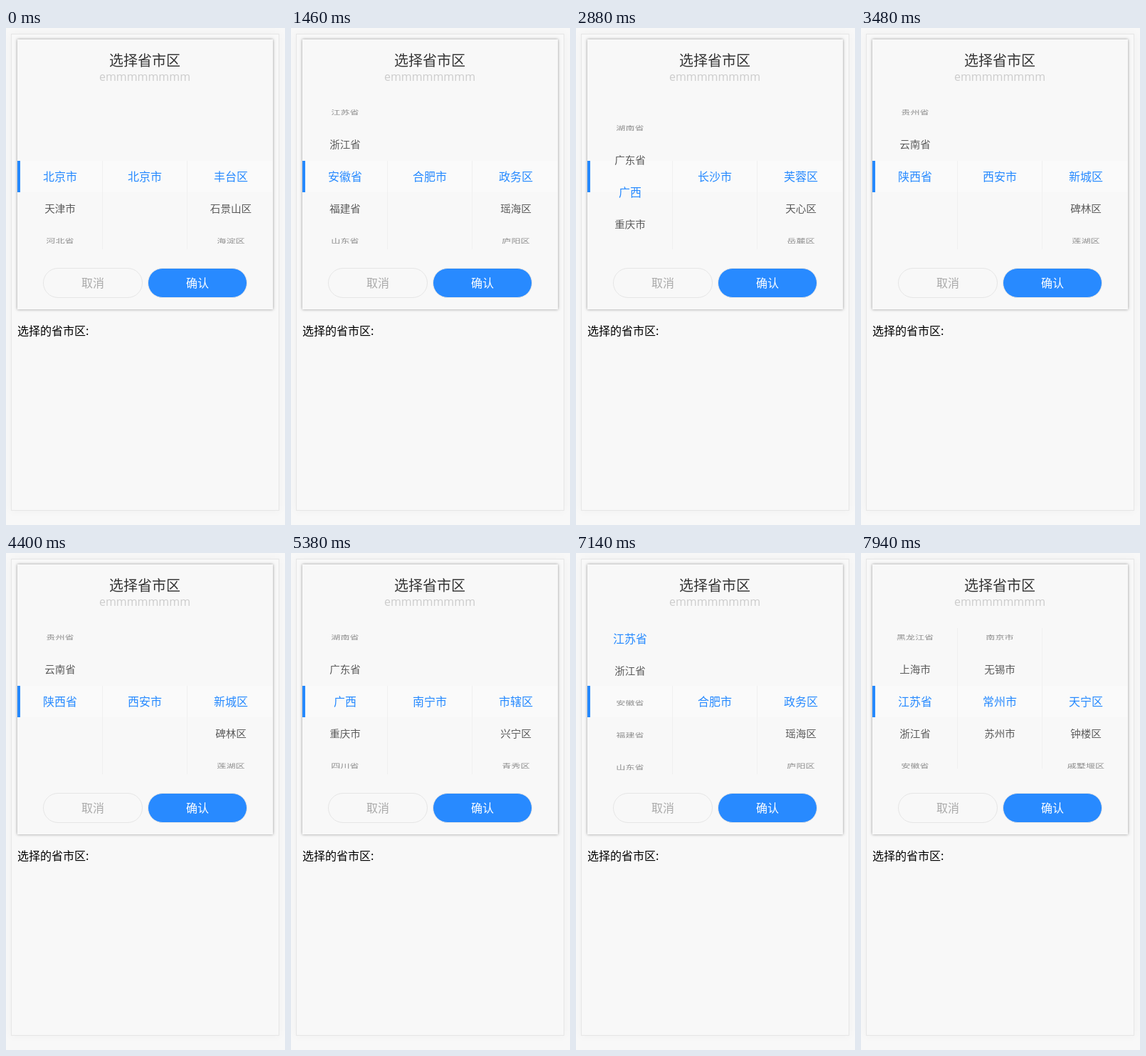
Animation, 392 px wide and 696 px high, one loop 8000 ms. Source, as an HTML page:

```html
<!DOCTYPE html>
<html lang="zh-CN">
<head>
<meta charset="utf-8">
<title>选择省市区</title>
<style>
  html, body { margin: 0; width: 100%; height: 100%; overflow: hidden; background: #f8f8f8; }
  body { position: relative; font: 16px/24px "Noto Sans CJK SC", "Noto Sans CJK", sans-serif; }
  div { position: absolute; box-sizing: border-box; white-space: nowrap; }
  .page { left: 7px; top: 8px; width: 377px; height: 668px; border: 1px solid #e6e6e6; box-shadow: 0 0 12px rgba(0,0,0,.04); }
  .panel { left: 16px; top: 16px; width: 359px; height: 378px; background: #f8f8f8; box-shadow: 0 0 4px rgba(0,0,0,.4); }
  .center { left: 0; width: 390px; text-align: center; }
  .title { top: 33px; font-size: 20px; color: #333; }
  .hint { top: 56px; font: 16px/24px "Open Sans", sans-serif; color: #ccc; }
  .band { left: 16px; top: 186px; width: 359px; height: 44px; background: #fafafa; border-left: 4px solid #2589ff; }
  .column { top: 105px; width: 120px; height: 205px; overflow: hidden; }
  .rail { left: 0; top: 81px; width: 120px; height: 206px; border: solid #f0f0f0; border-width: 0 1px; }
  .item { left: 0; top: 80px; width: 120px; height: 45px; line-height: 45px; text-align: center; color: #2589ff; }
  .near { color: #585858; }
  .far { color: #8c8c8c; }
  .button { top: 336px; height: 42px; line-height: 38px; border: 1px solid #e6e6e6; border-radius: 21px; text-align: center; }
  .cancel { left: 52px; width: 140px; color: #aaa; }
  .confirm { left: 199px; width: 140px; color: #fff; background: #288aff; }
  .result { left: 16px; top: 411px; color: #000; }
</style>
</head>
<body>
<div class="page"></div>
<div class="panel"></div>
<div class="center title">选择省市区</div>
<div class="center hint">emmmmmmmm</div>
<div class="band"></div>
<div class="column" style="left:16px"></div>
<div class="column" style="left:135px;width:121px"></div>
<div class="column" style="left:256px"></div>
<div class="button cancel">取消</div>
<div class="button confirm">确认</div>
<div class="result">选择的省市区:</div>
<script>
const LOOP = 8000, ROW = 45;

// One province per line: name | city districts... | next city...
const provinces = `北京市|北京市 丰台区 石景山区 海淀区
天津市|天津市 和平区 河东区 河西区
河北省|石家庄市 长安区 桥东区 桥西区
山西省|太原市 小店区 迎泽区 杏花岭区
内蒙古|呼和浩特市 新城区 回民区 玉泉区
辽宁省|沈阳市 和平区 沈河区 大东区
吉林省|长春市 南关区 宽城区 朝阳区
黑龙江省|哈尔滨市 道里区 南岗区 道外区
上海市|上海市 黄浦区 徐汇区 长宁区
江苏省|南京市 玄武区 白下区 秦淮区|无锡市 崇安区 南长区 北塘区|常州市 天宁区 钟楼区 戚墅堰区|苏州市 沧浪区 平江区 金阊区
浙江省|杭州市 上城区 下城区 江干区
安徽省|合肥市 政务区 瑶海区 庐阳区
福建省|福州市 鼓楼区 台江区 仓山区
山东省|济南市 市中区 历下区 天桥区
河南省|郑州市 中原区 二七区 管城回族区
湖北省|武汉市 江岸区 江汉区 硚口区
湖南省|长沙市 芙蓉区 天心区 岳麓区
广东省|广州市 荔湾区 越秀区 海珠区
广西|南宁市 市辖区 兴宁区 青秀区
重庆市|重庆市 万州区 涪陵区 渝中区
四川省|成都市 锦江区 青羊区 金牛区
贵州省|贵阳市 南明区 云岩区 花溪区
云南省|昆明市 五华区 盘龙区 官渡区
陕西省|西安市 新城区 碑林区 莲湖区 灞桥区 未央区`.split('\n').map(line => {
  const [name, ...cities] = line.split('|');
  return { name, cities: cities.map(city => {
    const [cityName, ...districts] = city.split(' ');
    return { name: cityName, districts };
  }) };
});

// Flicks: start, end, column, index reached
const flicks = [
  [580, 760, 0, 2], [920, 1080, 0, 7], [1280, 1460, 0, 11], [1680, 1860, 0, 12],
  [2060, 2240, 0, 14], [2460, 2620, 0, 16], [2800, 2960, 0, 18], [3100, 3260, 0, 21],
  [3400, 3480, 0, 23], [3800, 3960, 2, 2], [4240, 4400, 2, 0], [4640, 4800, 0, 22],
  [4920, 5060, 0, 20], [5220, 5380, 0, 18], [5800, 6000, 0, 17], [6140, 6340, 0, 15],
  [6520, 6720, 0, 13], [6820, 7000, 0, 11], [7140, 7340, 0, 9], [7780, 7940, 1, 2]
];

const columns = [...document.querySelectorAll('.column')];

// The CSS "ease" curve
function ease(x) {
  const bezier = (s, a, b) => 3 * s * (1 - s) ** 2 * a + 3 * s * s * (1 - s) * b + s ** 3;
  let low = 0, high = 1;
  for (let i = 0; i < 20; i++) {
    const mid = (low + high) / 2;
    if (bezier(mid, .25, .25) < x) low = mid; else high = mid;
  }
  return bezier(low, .1, 1);
}

// position: scroll offset in rows, target: highlighted row, settled: row the next column follows
function wheel(column, time) {
  let from = 0, state = { position: 0, target: 0, settled: 0 };
  for (const [start, end, c, target] of flicks) {
    if (c !== column || time < start) continue;
    const done = time >= end;
    const progress = done ? 1 : ease((time - start + 10) / (1.25 * (end - start)));
    state = { position: from + (target - from) * progress, target, settled: done ? target : from };
    from = target;
  }
  return state;
}

function drawColumn(element, names, { position, target }, rail) {
  let html = rail ? `<div class="rail" style="transform:translateY(${-position * ROW}px)"></div>` : '';
  names.forEach((name, i) => {
    const offset = i - position;
    if (Math.abs(offset) > 3) return;
    const distance = Math.min(2, Math.abs(i - target));
    const look = ['', 'near', 'far'][distance];
    const scale = ['1', '.91,.82', '.82,.52'][distance];
    html += `<div class="item ${look}" style="transform:translateY(${offset * ROW}px) scale(${scale})">${name}</div>`;
  });
  element.innerHTML = html;
}

function render(time) {
  const wheels = [0, 1, 2].map(c => wheel(c, time));
  const { cities } = provinces[wheels[0].settled];
  const city = cities[wheels[1].settled] || cities[0];
  const nameOf = entry => entry.name;
  drawColumn(columns[0], provinces.map(nameOf), wheels[0]);
  drawColumn(columns[1], cities.map(nameOf), wheels[1], true);
  drawColumn(columns[2], city.districts, wheels[2]);
}

function tick() {
  render(performance.now() % LOOP);
  requestAnimationFrame(tick);
}
tick();
</script>
</body>
</html>
```
